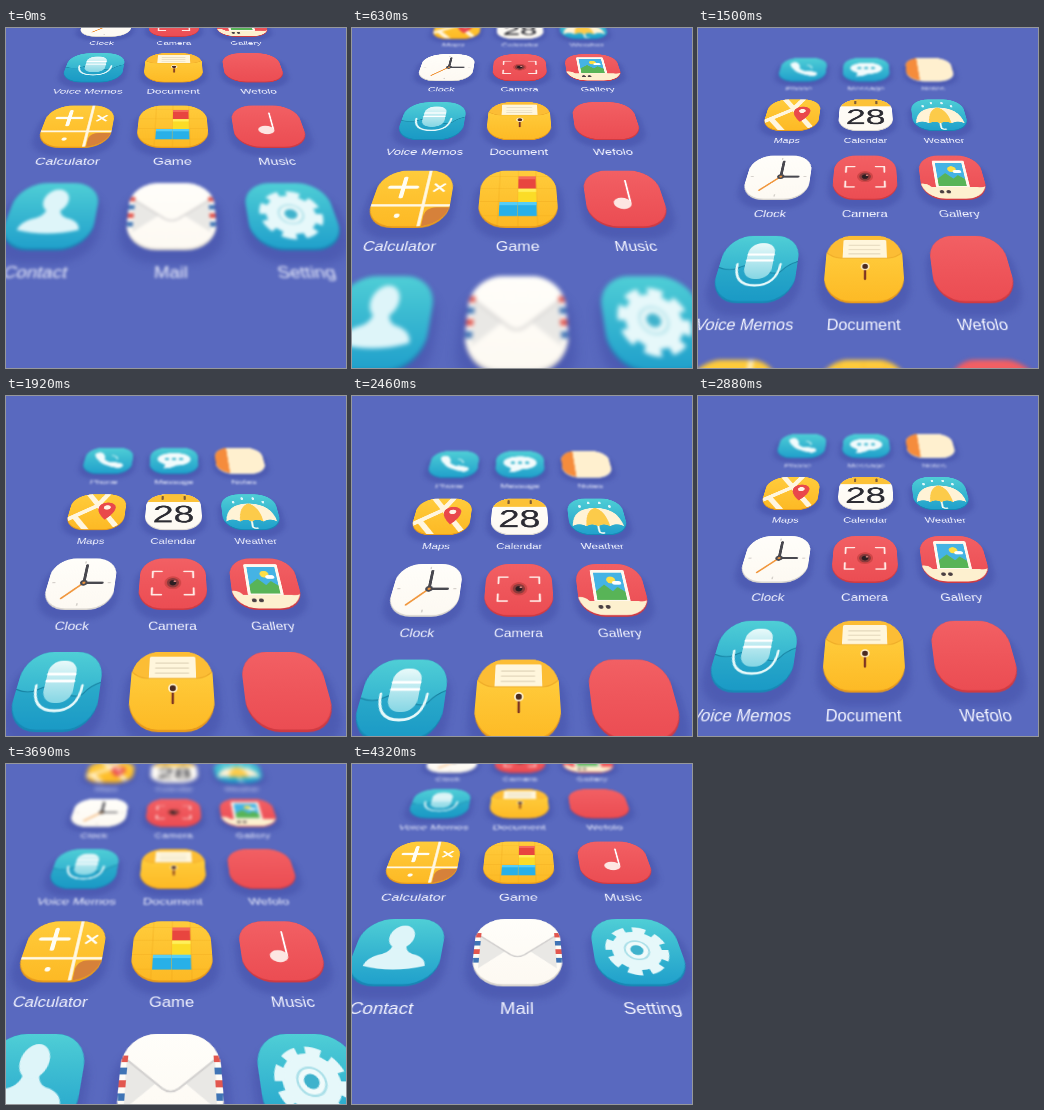
Recreate the animation shown at these times as an HTML page. Size 340x340 px, loop 4500 ms.

```html
<!DOCTYPE html>
<html lang="en">
<head>
<meta charset="utf-8">
<title>Icon plane</title>
<style>
  html, body { margin: 0; width: 100%; height: 100%; overflow: hidden; background: #5969bf; }
  #stage { position: relative; width: 100%; height: 100%; overflow: hidden; contain: strict; }
  #stage > svg { position: absolute; left: 0; top: 0; }
  .row { position: absolute; left: 0; top: 0; width: 100%; height: 100%; }
  .row svg { position: absolute; left: -210px; top: -100px; transform-origin: 210px 100px; overflow: visible; }
  text { font-family: "Liberation Sans", Arial, sans-serif; text-anchor: middle; }
</style>
</head>
<body>
<div id="stage">
<svg width="1" height="1">
  <defs>
    <filter id="soft" x="-30%" y="-30%" width="160%" height="160%"><feGaussianBlur stdDeviation="3.5"/></filter>
    <clipPath id="face"><rect x="-44" y="-44" width="88" height="85.5" rx="31"/></clipPath>
    <linearGradient id="teal" x2="0" y2="1"><stop stop-color="#50cfd6"/><stop offset="1" stop-color="#1f9fcb"/></linearGradient>
    <linearGradient id="gold" x2="0" y2="1"><stop stop-color="#ffcc3c"/><stop offset="1" stop-color="#fdb924"/></linearGradient>
    <linearGradient id="red" x2="0" y2="1"><stop stop-color="#f26064"/><stop offset="1" stop-color="#eb4c52"/></linearGradient>
    <linearGradient id="white" x2="0" y2="1"><stop stop-color="#fffefa"/><stop offset="1" stop-color="#fdf9f2"/></linearGradient>
    <linearGradient id="ice" x2="0" y2="1"><stop stop-color="#e9fafa"/><stop offset="1" stop-color="#86d6e4"/></linearGradient>
  </defs>
</svg>
</div>
<script>
const rims = { teal: '#1788b5', gold: '#e79a1c', red: '#cf3a42', white: '#d9d5cf' };

const rect = (x, y, w, h, fill, rx = 0) =>
  `<rect x="${x}" y="${y}" width="${w}" height="${h}" rx="${rx}" fill="${fill}"/>`;
const disc = (x, y, r, fill) => `<circle cx="${x}" cy="${y}" r="${r}" fill="${fill}"/>`;
const shape = (d, fill) => `<path d="${d}" fill="${fill}"/>`;
const line = (d, color, w) =>
  `<path d="${d}" fill="none" stroke="${color}" stroke-width="${w}" stroke-linecap="round" stroke-linejoin="round"/>`;
const block = (x, y, color, top) => rect(x, y, 20.5, 20.5, color) + rect(x, y, 20.5, 5, top);
const stamps = x => ['#e2574f', '#3f74b5', '#e2574f', '#3f74b5']
  .map((c, i) => rect(x, -23 + i * 11, 6, 6, c)).join('');

const art = {
  Contact: shape('M-7 -8 Q-7 2 -15 5 Q-29 9 -30 20 Q0 29 30 20 Q29 9 15 5 Q7 2 7 -8Z', '#def5f9') +
    '<ellipse cy="-18" rx="13" ry="16" fill="#def5f9"/>',
  Mail: shape('M-39 -19 L-13 2 L-38 23Z M39 -19 L13 2 L38 23Z', '#e9e8e5') +
    line('M-40 -20 L-7 6 Q0 11 7 6 L40 -20', '#d2d0cf', 1.6) + stamps(-44) + stamps(38),
  Setting: disc(0, 0, 25, '#e6f8fa') +
    '<circle r="27" fill="none" stroke="#e6f8fa" stroke-width="9" stroke-dasharray="13 8.2"/>' +
    disc(0, 0, 13, '#a9dfe8') + disc(0, 0, 11, '#f0fbfb') + disc(0, 0, 6.5, '#3fb2cc'),

  Calculator: shape('M17 45 V27 Q18 15 30 15 H45 V45Z', '#d6813a') +
    line('M14 -46 V46 M-46 12 H46', '#fff8e4', 3.6) +
    line('M-29 -16 H2 M-13.5 -31 V-1', '#fffdf4', 5) +
    line('M23 -21 L34 -10 M34 -21 L23 -10', '#fffdf4', 3) + disc(-12, 27, 3, '#fffdf4'),
  Game: line('M-22 -45 V42 M0 -45 V42 M21 -45 V42 M-45 -34 H45 M-45 -14 H45 M-45 6.5 H45 M-45 27 H45', 'rgba(232,155,20,.35)', 1) +
    block(0, -34, '#e8453f', '#f56a5a') + block(0, -13.5, '#fbdc27', '#fff05a') +
    block(-21, 7, '#28b0e8', '#55cdf7') + block(0, 7, '#28b0e8', '#55cdf7'),
  Music: line('M6 8 L6 -27', '#fff', 2.2) + '<ellipse cx="-3" cy="9" rx="10" ry="8.5" fill="#fde6e2"/>',

  'Voice Memos': shape('M-45 0 Q-30 6 -20 0 T6 3 T28 4 T45 -8 V45 H-45Z', 'rgba(15,140,185,.35)') +
    line('M-45 0 Q-30 6 -20 0 T6 3 T28 4 T45 -8', '#167f9f', 1.2) +
    rect(-15, -33, 31, 48, 'url(#ice)', 14) + line('M-14 -17 H15 M-14 -9 H15', '#fff', 3) +
    line('M-24 -4 Q-23 23 1 23 Q24 23 25 -4', '#e6f9fa', 2.8),
  Document: rect(-45, -45, 90, 45, '#fcbd35') + rect(-25, -38, 51, 36, '#fff6dc', 2) +
    line('M-18 -30 H18 M-18 -24 H18 M-18 -18 H18', '#e3d8bd', 1.5) +
    shape('M-46 -22 Q-38 -13 -27 -12 H27 Q38 -13 46 -22 V46 H-46Z', 'url(#gold)') +
    line('M-46 -22 Q-38 -13 -27 -12 H27 Q38 -13 46 -22', '#eeab28', 1.2) +
    line('M1 0 V15', '#7d3522', 2.5) + disc(1, -1, 5, '#fff2cf') + disc(1, -1, 3.2, '#4a2a20'),
  Wefolo: '',

  Clock: line('M0 -38 V-35 M0 34 V37 M-38 0 H-35 M38 0 H35', '#c9c4be', 1.5) +
    line('M3 0 V-31 M3 0 H27', '#48484f', 4) + line('M3 0 L-22 26', '#f0963c', 2.6) +
    disc(3, 0, 5, '#48484f') + disc(3, 0, 2, '#f0963c'),
  Camera: line('M-27 -9 V-20 H-15 M15 -20 H27 V-9 M27 9 V20 H15 M-15 20 H-27 V9', '#ffe9e4', 2.6) +
    disc(0, 0, 11, '#cf4647') + disc(0, 0, 8, '#8a3a3b') + disc(0, 0, 4.5, '#2b1e22') + disc(2.5, -2.5, 1.6, '#e58b86'),
  Gallery: rect(-24, -33, 46, 54, '#fff8ee', 2) + rect(-20, -28, 38, 46, '#45b3e4') +
    disc(2, -15, 6, '#ffdf45') + line('M6 -10 H12', '#fff', 6) +
    shape('M-20 18 V4 L-8 -7 L2 4 L9 -3 L18 5 V18Z', '#58b457') +
    shape('M-45 14 Q-36 12 -30 20 H32 Q40 22 45 17 V46 H-45Z', '#fdf0cf') +
    disc(-17, 29, 3, '#4a3f42') + disc(-8, 29, 3, '#4a3f42'),

  Maps: line('M-50 24 L-2 -14 L14 -48 M-20 -46 L40 46 M-34 12 L-8 48', '#fff6df', 9) +
    shape('M14 20 Q0 3 1 -9 A13.5 13.5 0 0 1 28 -9 Q28 4 14 20Z', '#e9484b') + disc(14.5, -10, 5.5, '#fff4e6'),
  Calendar: rect(-45, -45, 90, 22, '#fcc237') +
    line('M-18 -38 V-31 M18 -38 V-31', '#7d5b35', 3.5) +
    '<text y="26" font-size="58" fill="#2c2c33" stroke="#2c2c33" stroke-width=".6">28</text>',
  Weather: line('M0 -12 V35 Q0 40 7 39', '#f6fbf2', 3) +
    shape('M-39 24 Q-36 -19 0 -20 Q36 -19 39 24 Q29 15 18 24 Q9 16 0 24 Q-9 16 -18 24 Q-29 15 -39 24Z', '#fff3d6') +
    shape('M-18 24 Q-16 -13 0 -20 Q16 -13 18 24 Q9 16 0 24 Q-9 16 -18 24Z', '#fccb4a') +
    line('M-24 -25 V-22 M-9 -34 V-31 M9 -34 V-31 M24 -25 V-22', '#e2f8fa', 4),

  Phone: line('M-17 -15 Q-14 10 15 16', '#f1fbfc', 11) +
    line('M-19 -19 L-15 -9 M9 13 L20 17', '#f1fbfc', 16) +
    line('M6 -16 Q14 -14 16 -4', '#bfecf0', 3),
  Message: shape('M0 -25 C40 -25 40 16 4 17 Q-8 28 -20 26 Q-15 20 -17 13 C-43 -2 -28 -25 0 -25Z', '#f1fbfc') +
    [-13, 0, 13].map(x => disc(x, -4, 4, '#37b3cb')).join(''),
  Notes: rect(-45, -45, 90, 90, '#fff0cf') + rect(-45, -45, 24, 90, '#f58c3c')
};

// From the nearest row to the farthest one.
const rows = [
  [['Contact', 'teal'], ['Mail', 'white'], ['Setting', 'teal']],
  [['Calculator', 'gold'], ['Game', 'gold'], ['Music', 'red']],
  [['Voice Memos', 'teal'], ['Document', 'gold'], ['Wefolo', 'red']],
  [['Clock', 'white'], ['Camera', 'red'], ['Gallery', 'red']],
  [['Maps', 'gold'], ['Calendar', 'white'], ['Weather', 'teal']],
  [['Phone', 'teal'], ['Message', 'teal'], ['Notes', 'white']]
];

const icon = ([name, skin], col) => `<g transform="translate(${(col - 1) * 120})">
  <rect x="-50" y="-34" width="100" height="92" rx="34" fill="#3c4aa2" opacity=".42" filter="url(#soft)"/>
  ${rect(-44, -44, 88, 88, rims[skin], 31)}
  <g clip-path="url(#face)">${rect(-45, -45, 90, 90, `url(#${skin})`)}${art[name]}</g>
  <text y="73" font-size="16.4" fill="#f4f5ff">${name}</text></g>`;

const stage = document.getElementById('stage');
const layers = rows.map(row => {
  const el = document.createElement('div');
  el.className = 'row';
  el.innerHTML = `<svg width="420" height="200" viewBox="-210 -100 420 200">${row.map(icon).join('')}</svg>`;
  stage.append(el);
  return el;
});

// Smooth curve through [time, value] keys, at rest at both ends.
function curve(keys, t) {
  const last = keys.length - 1;
  const slope = i => i === 0 || i === last ? 0 :
    (keys[i + 1][1] - keys[i - 1][1]) / (keys[i + 1][0] - keys[i - 1][0]);
  let i = 0;
  while (i < last - 1 && t >= keys[i + 1][0]) i++;
  const [t0, a] = keys[i], [t1, b] = keys[i + 1], d = t1 - t0, x = (t - t0) / d;
  return a + (b - a) * x * x * (3 - 2 * x) +
    d * x * (1 - x) * (slope(i) * (1 - x) - slope(i + 1) * x);
}

const distance = [[0, 3.88], [630, 3.38], [1110, 2.75], [1620, 2.25], [1920, 2.07], [2280, 2],
  [2700, 2.11], [2880, 2.25], [3240, 2.63], [3690, 3.28], [4320, 3.88]];
const focus = [[0, 1.5], [630, 1.6], [1110, 2.1], [1920, 2.8], [2880, 2.6], [3690, .35], [4320, 0]];

const vanishX = 171, horizon = -246, spread = 463, colSize = 120, rowSize = 146;

function draw(now) {
  const t = Math.min(4320, Math.floor(now % 4500 / 30) * 30);
  const u = curve(distance, t), sharp = curve(focus, t), height = 2786 - 286 * u;
  layers.forEach((el, r) => {
    const z = u + r;
    const m = [
      spread / colSize, 0, 0, 0,
      -vanishX / rowSize, -horizon / rowSize, 0, -1 / rowSize,
      0, 0, z, 0,
      vanishX * z - .045 * spread, horizon * z + height, 0, z
    ].map(v => (v / z).toFixed(7));
    el.firstChild.style.transform = `matrix3d(${m})`;
    const blur = 6 * Math.abs(r - sharp) / z - .8;
    el.style.filter = blur > .05 ? `blur(${blur.toFixed(2)}px)` : 'none';
  });
}

const start = performance.now();
function tick() {
  draw(performance.now() - start);
  requestAnimationFrame(tick);
}
tick();
</script>
</body>
</html>
```
